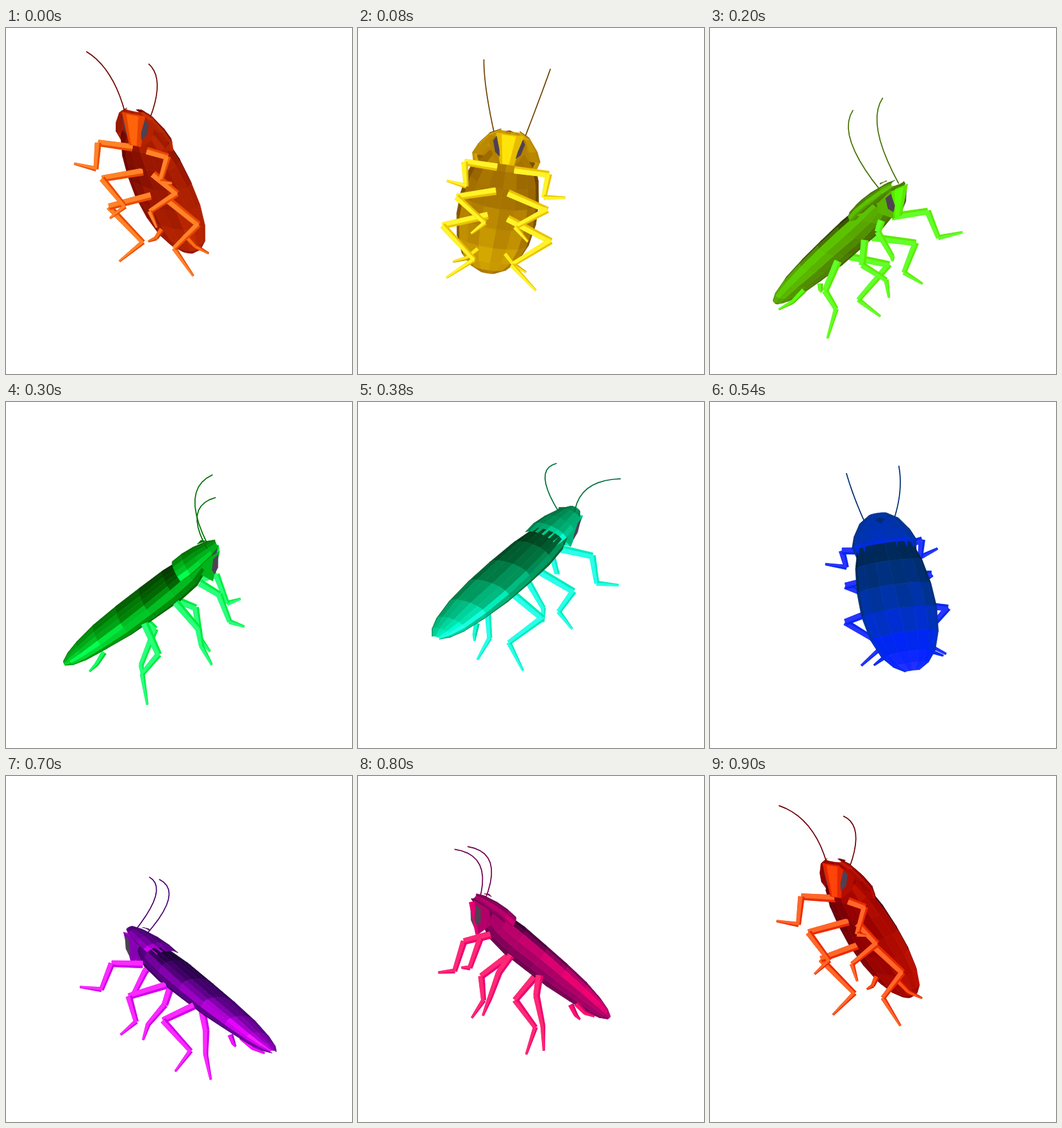
Animation, 540 px wide and 540 px high, one loop 0.92 s. Source, as an HTML page with a canvas:

```html
<!DOCTYPE html>
<html>
<head>
<meta charset="utf-8">
<style>
html, body { margin: 0; width: 100%; height: 100%; overflow: hidden; background: #fff; }
canvas { display: block; }
</style>
</head>
<body>
<canvas id="stage" width="540" height="540"></canvas>
<script>
const ctx = document.getElementById('stage').getContext('2d');
const LOOP = 920, STEP = 20;

// time, origin x y, screen axes of forward, left and dorsal, antenna tip (forward, left, dorsal)
const KEYS = [
  [0,   242, 240, -.28, -.74, .81, .16, .25, -.72,   252, 60, 10],
  [80,  220, 272, .12, -.74, .98, .14, .03, -.65,    215, 53, 87],
  [200, 200, 336, .62, -.62, .58, -.24, -.63, -.76,  200, 40, 123],
  [380, 229, 269, .73, -.67, -.5, -.12, -.42, -.82,  199, 100, 34],
  [540, 289, 299, -.18, -.82, -.93, .13, 0, -.38,    196, 44, 87],
  [700, 307, 336, -.75, -.64, -.39, -.09, .63, -.75, 174, 20, 87],
  [900, 250, 239, -.38, -.71, .74, .12, .3, -.8,     250, 68, 9]
];

// hip, knee, ankle and toe of each left leg
const LEGS = [
  [[95, 14, -27], [114, 67, -48], [102, 62, -91], [119, 94, -104]],
  [[47, 10, -29], [58, 72, -69], [41, 24, -101], [39, 45, -129]],
  [[-10, 16, -24], [-13, 86, -60], [-57, 30, -79], [-74, 71, -112]]
];
const LEG_WIDTHS = [11, 9.5, 7, 3];
const CERCUS = [[-86, 22, -20], [-104, 38, -24], [-117, 58, -22]];

// station along the body, half width, height above and depth below
const BODY = [
  [112, 30, 8, 20], [90, 46, 13, 29], [55, 56, 16, 31], [10, 62, 16, 28], [-35, 63, 16, 25],
  [-80, 57, 15, 19], [-115, 45, 11, 14], [-135, 30, 7, 9], [-147, 12, 2, 3]
];
const SHIELD = [[150, 16, 7, 2], [138, 33, 12, 3], [115, 47, 17, 4], [95, 54, 19, 4], [76, 50, 19, 3]];
const SIDES = 16;

const bob = t => -45 * Math.cos(4 * Math.PI * t / LOOP);
const mix = (a, b, k) => a + (b - a) * k;
const mean = list => list.reduce((a, b) => a + b, 0) / list.length;
const mirror = ([u, v, w], side) => [u, v * side, w];

function pose(t) {
  const n = KEYS.length;
  const i = KEYS.findLastIndex(k => k[0] <= t);
  const [a, b, c, d] = [-1, 0, 1, 2].map(o => {
    const row = KEYS[(i + o + n) % n].slice();
    row[2] -= bob(row[0]);
    row[0] += LOOP * Math.floor((i + o) / n);
    return row;
  });
  const slope = (p, q, r, j) => {
    const h = q[0] - p[0], g = r[0] - q[0];
    return ((q[j] - p[j]) / h * g + (r[j] - q[j]) / g * h) / (h + g);
  };
  const h = c[0] - b[0], s = (t - b[0]) / h;
  const out = b.map((_, j) =>
    b[j] * (1 + 2 * s) * (1 - s) ** 2 + c[j] * s * s * (3 - 2 * s) +
    h * s * (1 - s) * ((1 - s) * slope(a, b, c, j) - s * slope(b, c, d, j)));
  out[2] += bob(t);
  return out;
}

function draw(t) {
  const [, ox, oy, ux, uy, vx, vy, wx, wy, ...tip] = pose(t);
  const near = [wx * vy - vx * wy, ux * wy - wx * uy, vx * uy - ux * vy];
  const project = ([u, v, w]) => [ox + u * ux + v * vx + w * wx, oy + u * uy + v * vy + w * wy];
  const depth = p => p[0] * near[0] + p[1] * near[1] + p[2] * near[2];
  const color = l => `hsl(${16 + 360 * t / LOOP + (l - .42) * 60} 100% ${l * 100}%)`;
  const items = [];

  function polygon(points, fill) {
    ctx.beginPath();
    points.forEach(p => ctx.lineTo(...p));
    ctx.closePath();
    ctx.fillStyle = ctx.strokeStyle = fill;
    ctx.lineWidth = .7;
    ctx.fill();
    ctx.stroke();
  }

  function add(z, paint) { items.push({ z, paint }); }

  function face(points, fill, bias = 0) {
    add(mean(points.map(depth)) + bias, () => polygon(points.map(project), fill));
  }

  // how squarely a quad faces the viewer; negative when turned away
  function facing([a, b, c, d]) {
    const p = c.map((x, i) => x - a[i]), q = d.map((x, i) => x - b[i]);
    const n = [p[1] * q[2] - p[2] * q[1], p[2] * q[0] - p[0] * q[2], p[0] * q[1] - p[1] * q[0]];
    return Math.min(1, depth(n) / Math.hypot(...n));
  }

  function loft(stations, shade) {
    const point = ([u, half, top, bottom], j) => {
      const a = 2 * Math.PI * j / SIDES, s = Math.sin(a);
      return [u, half * Math.cos(a), s * (s > 0 ? top : bottom)];
    };
    for (let i = 0; i + 1 < stations.length; i++) {
      for (let j = 0; j < SIDES; j++) {
        const [p, q] = [stations[i], stations[i + 1]];
        const quad = [point(p, j), point(q, j), point(q, j + 1), point(p, j + 1)];
        const f = facing(quad);
        if (f <= 0) continue;
        const noise = .025 * Math.sin(i * 37 + j * j * 11);
        face(quad, color((shade(mean([p[0], q[0]]), j < SIDES / 2) + noise) * (.4 + .6 * f)));
      }
    }
  }

  function limb(points, widths, light, dark) {
    for (let i = 0; i + 1 < points.length; i++) {
      const z = mean([depth(points[i]), depth(points[i + 1])]) + 8;
      add(z, () => {
        const [a, b] = [project(points[i]), project(points[i + 1])];
        const dx = b[0] - a[0], dy = b[1] - a[1], len = Math.hypot(dx, dy) || 1;
        const off = (p, r) => [p[0] - dy / len * r, p[1] + dx / len * r];
        const r = widths[i] / 2, q = widths[i + 1] / 2;
        polygon([off(a, r), off(b, q), off(b, -q), off(a, -r)], dark);
        polygon([off(a, r), off(b, q), off(b, -q * .3), off(a, -r * .3)], light);
      });
    }
  }

  function antenna(side) {
    const base = [135, 24, 5];
    const bend = base.map((x, i) => mean([x, tip[i]]) + [-20, 8, 50][i]);
    add(depth(mirror(base, side)), () => {
      ctx.beginPath();
      for (let k = 0; k <= 1.001; k += .1) {
        const p = base.map((x, i) => mix(mix(x, bend[i], k), mix(bend[i], tip[i], k), k));
        ctx.lineTo(...project(mirror(p, side)));
      }
      ctx.strokeStyle = color(.22);
      ctx.lineWidth = 1.7;
      ctx.stroke();
    });
  }

  const along = u => (u + 147) / 235;
  loft(BODY, (u, top) => top ? mix(.6, .2, along(u)) : mix(.54, .38, along(u)));
  loft(SHIELD, u => u < 100 ? .5 : .44);

  // head between the shield and the front legs
  face([[148, 22, -6], [148, -22, -6], [112, -11, -37], [112, 11, -37]], color(.45), 6);
  face([[147, 9, -8], [147, -13, -8], [113, -7, -37], [113, 3, -37]], color(.52), 7);
  face([[132, 8, 18.5], [138, 0, 15], [132, -8, 18.5], [125, 0, 19]], color(.22), 2);

  for (const side of [1, -1]) {
    const at = p => mirror(p, side);
    face([[148, 22, -6], [112, 11, -37], [104, 20, -16], [122, 30, -2]].map(at), color(.35));
    face([[143, 21, -9], [134, 25, -9], [122, 20, -22], [121, 13, -30], [131, 15, -25]].map(at), '#4e4152', 9);
    LEGS.forEach(leg => limb(leg.map(at), LEG_WIDTHS, color(.58), color(.46)));
    limb(CERCUS.map(at), [8, 6, 2.5], color(.54), color(.4));
    antenna(side);
  }

  ctx.fillStyle = '#fff';
  ctx.fillRect(0, 0, 540, 540);
  items.sort((a, b) => a.z - b.z).forEach(item => item.paint());
}

function tick() {
  draw(Math.floor(performance.now() % LOOP / STEP) * STEP);
  requestAnimationFrame(tick);
}
tick();
</script>
</body>
</html>
```
